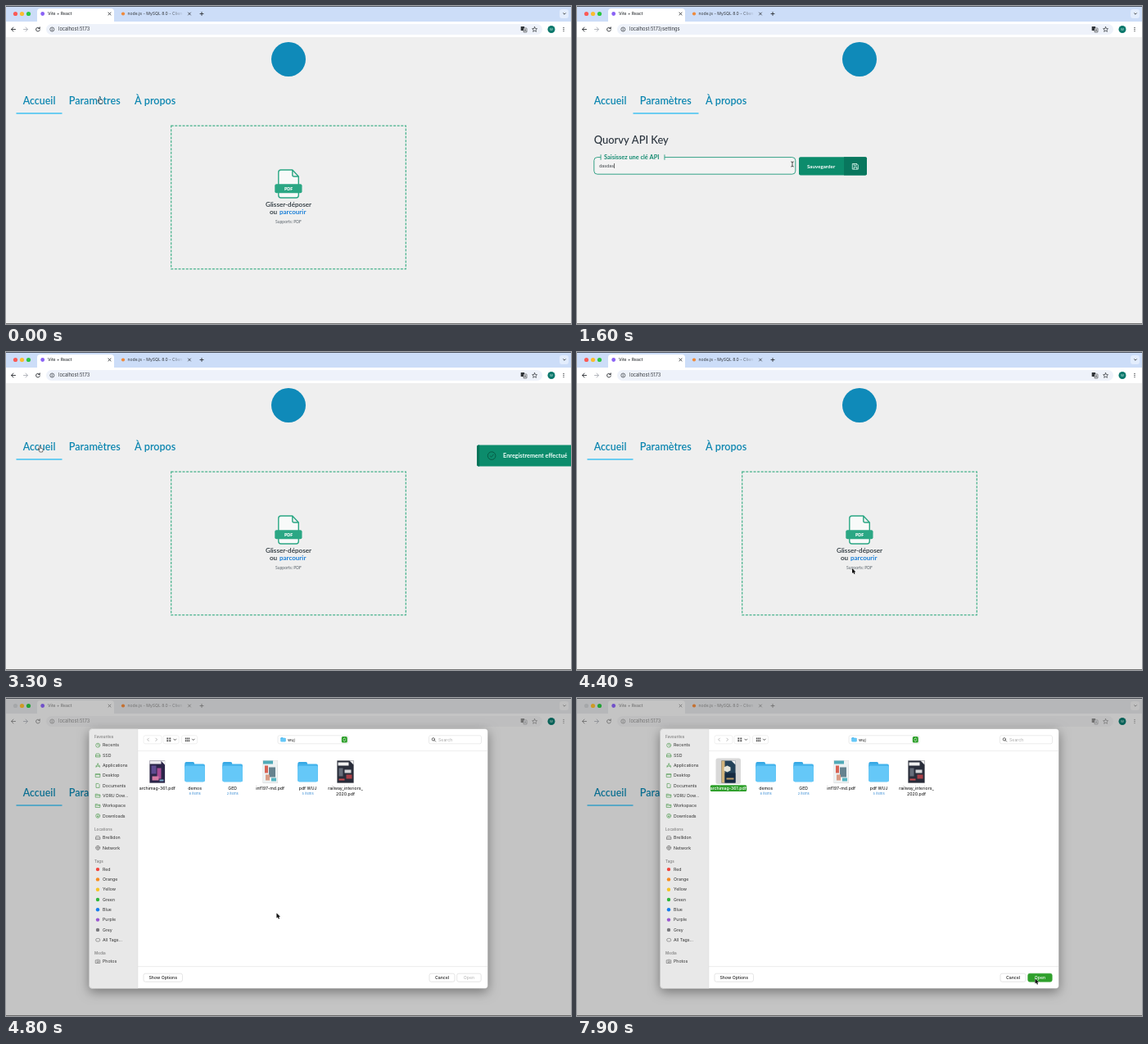
An HTML page with a canvas for the animation above (8000 ms loop, 690x388 px).

```html
<!DOCTYPE html>
<html lang="fr">
<head>
<meta charset="utf-8">
<style>
html, body { margin: 0; width: 100%; height: 100%; overflow: hidden; background: #efefef; }
canvas { display: block; width: 690px; height: 388px; }
</style>
</head>
<body>
<canvas id="stage"></canvas>
<script>
const LOOP = 8000, W = 690, H = 388;
const canvas = document.getElementById('stage');
const c = canvas.getContext('2d');
const ratio = window.devicePixelRatio || 1;
canvas.width = W * ratio;
canvas.height = H * ratio;

const UI = 'Inter, sans-serif', PAGE = 'Lato, sans-serif';
const GREEN = '#0c8c6c', SELECT = '#2fa02c';
const SETTINGS_AT = 300, SAVE_AT = 2200, HOME_AT = 3300;
const DIALOG_AT = 4450, SETTLE_AT = 4650, PICK_AT = 5450;

const clamp = v => Math.max(0, Math.min(1, v));
const ease = v => v * v * (3 - 2 * v);
const ramp = (t, from, to) => ease(clamp((t - from) / (to - from)));

function text(s, x, y, size, color, { font = UI, weight = 400, align = 'left' } = {}) {
  c.font = `${weight} ${size}px ${font}`;
  c.textAlign = align;
  c.textBaseline = 'middle';
  c.fillStyle = color;
  c.fillText(s, x, y);
}
function rect(x, y, w, h, color) {
  c.fillStyle = color;
  c.fillRect(x, y, w, h);
}
function box(x, y, w, h, r, fill, stroke, width = 0.7) {
  c.beginPath();
  c.roundRect(x, y, w, h, r);
  if (fill) { c.fillStyle = fill; c.fill(); }
  if (stroke) { c.strokeStyle = stroke; c.lineWidth = width; c.stroke(); }
}
function dot(x, y, r, fill, stroke, width = 0.7) {
  box(x - r, y - r, 2 * r, 2 * r, r, fill, stroke, width);
}
function path(d, x, y, { stroke, fill, width = 0.9 } = {}) {
  const p = new Path2D(d);
  c.save();
  c.translate(x, y);
  c.lineCap = c.lineJoin = 'round';
  if (fill) { c.fillStyle = fill; c.fill(p); }
  if (stroke) { c.strokeStyle = stroke; c.lineWidth = width; c.stroke(p); }
  c.restore();
}
const CROSS = 'M-1.5-1.5L1.5 1.5M1.5-1.5L-1.5 1.5';
const DOWN = 'M-1.4-.7L0 .7L1.4-.7';

function browser(url, inactive, sheet) {
  const ink = inactive ? '#8b8b8b' : '#303438';
  rect(0, 0, W, 20, inactive ? '#dedfe1' : '#ccddf8');
  dot(11.5, 9.5, 2.6, sheet ? '#c9cbce' : '#fb5b57');
  dot(19.5, 9.5, 2.6, '#fbbc2f');
  dot(27.5, 9.5, 2.6, '#2bc642');
  box(38, 3, 94, 20, 4, inactive ? '#efefef' : '#fff');
  rect(0, 19, W, 19, inactive ? '#efefef' : '#fff');

  dot(44.7, 9.5, 2.4, '#8a62f5');
  text('Vite + React', 51, 9.7, 5.1, ink, { weight: 500 });
  path(CROSS, 126.5, 9.5, { stroke: ink });
  dot(143, 9.5, 2.1, '#ef8a3c');
  const fade = c.createLinearGradient(200, 0, 216, 0);
  fade.addColorStop(0, ink);
  fade.addColorStop(1, 'rgba(80,85,95,.15)');
  text('node.js - MySQL 8.0 - Clien', 148.5, 9.7, 5.1, fade);
  path(CROSS, 224, 9.5, { stroke: ink, width: 0.8 });
  path('M-2 0H2M0-2V2', 239, 9.5, { stroke: ink });
  box(676, 4, 11, 11, 3, inactive ? '#eaeaea' : '#e3edfd');
  path(DOWN, 682, 9.5, { stroke: ink });

  path('M2.5 0H-2.5M0-2.5L-2.5 0L0 2.5', 9, 28.5, { stroke: ink });
  path('M-2.5 0H2.5M0-2.5L2.5 0L0 2.5', 24, 28.5, { stroke: '#aeb2b8' });
  path('M2-1.3A2.4 2.4 0 1 0 2.4 .5M2.3-2.7V-1H.7', 39, 28.5, { stroke: ink });
  box(49, 22, 606, 13, 6.5, inactive ? '#e8e8e9' : '#eef2fa');
  dot(56.3, 28.5, 2.5, null, ink, 0.7);
  path('M0 0V1.2M0-1.2V-1.1', 56.3, 28.5, { stroke: ink, width: 0.7 });
  text(url, 64, 28.6, 5.7, ink);
  box(628.7, 25, 4.4, 5, 0.5, ink);
  box(632, 27, 4, 5, 0.5, '#f4f6fa', ink, 0.6);
  path('M-1 1.5L0-1.2L1 1.5', 634, 29.5, { stroke: ink, width: 0.6 });
  path('M0-3L.9-1L3-.8L1.4 .7L1.9 2.8L0 1.7L-1.9 2.8L-1.4 .7L-3-.8L-.9-1Z', 645.6, 28.5, { stroke: ink, width: 0.7 });
  dot(666, 28.5, 4.5, '#0b786c');
  text('W', 666, 28.8, 4, '#d9efe9', { align: 'center' });
  for (let i = -1; i <= 1; i++) dot(681, 28.5 + 2.1 * i, 0.65, ink);
}

function pageHeader(settings) {
  rect(0, 38, W, H - 38, '#efefef');
  dot(345, 65, 21, '#0f8ab9');
  const nav = { font: PAGE, weight: 600 };
  text('Accueil', 20.7, 116.3, 12.4, '#0c86b0', nav);
  text('Paramètres', 76.7, 116.3, 12.6, '#0c86b0', nav);
  text('À propos', 157, 116.3, 12.6, '#0c86b0', nav);
  rect(settings ? 68.5 : 12.5, 130.2, settings ? 80 : 56, 1.6, '#4cc5f2');
}

function homePage() {
  c.save();
  c.strokeStyle = '#45b18b';
  c.lineWidth = 1.2;
  c.setLineDash([3, 1.6]);
  c.strokeRect(201.7, 146.2, 286.6, 174.6);
  c.restore();
  path('M3 0H17L24.5 8V31Q24.5 34 21.5 34H3Q0 34 0 31V3Q0 0 3 0ZM17 0V6Q17 8 19 8H24.5', 332.8, 200, { stroke: '#2ba784', fill: '#f8faf9', width: 1.4 });
  box(328.3, 217.3, 33.2, 11, 2, '#2ba784');
  text('PDF', 345, 223, 5.2, '#fff', { font: PAGE, weight: 900, align: 'center' });
  text('Glisser-déposer', 345, 242.6, 8.1, '#273239', { font: PAGE, weight: 600, align: 'center' });
  text('ou', 322, 251.8, 8.1, '#273239', { font: PAGE, weight: 600 });
  text('parcourir', 334, 251.8, 8, '#1c80d8', { font: PAGE, weight: 700 });
  text('Supports: PDF', 345, 263, 5, '#59626a', { font: PAGE, align: 'center' });
}

function settingsPage(t) {
  text('Quorvy API Key', 20.7, 164.5, 12.9, '#28323c', { font: PAGE, weight: 500 });
  box(20.8, 184.6, 246, 20.6, 4, '#f3f3f3', '#35a287', 1);
  rect(29, 183, 78, 4, '#f0f0f0');
  rect(28.6, 181.3, 0.9, 6.5, '#2a9d80');
  rect(106.5, 181.3, 0.9, 6.5, '#2a9d80');
  text('Saisissez une clé API', 33, 184.6, 7.4, '#138a70', { font: PAGE, weight: 700 });
  const typed = 'dasdasd'.slice(0, Math.max(0, Math.floor((t - 1150) / 75)));
  text(typed, 27, 195.2, 5.3, '#3c4146');
  if (t > 1100 && t < SAVE_AT) rect(27.3 + c.measureText(typed).width, 192, 0.7, 6, '#333');
  box(271, 184.3, 83, 22.3, 2, GREEN);
  box(326, 184.3, 28, 22.3, [0, 2, 2, 0], '#08765d');
  text('Sauvegarder', 281, 195.8, 6.2, '#fff', { font: PAGE, weight: 700 });
  path('M-3.3-3.3H1.8L3.3-1.8V3.3H-3.3ZM-1.8-3.2V-1.2H1.2V-3.2M-1.8 3.2V.7H1.8V3.2', 340, 195.8, { stroke: '#e5fff6', width: 0.8 });
}

function toast(t) {
  const shown = ramp(t, 2250, 2500) - ramp(t, 3200, 3450);
  if (shown <= 0) return;
  c.save();
  c.translate((1 - shown) * 182, 0);
  box(510, 113.6, 172.6, 26, 2, GREEN);
  box(510, 113.6, 3, 26, [2, 0, 0, 2], '#087258');
  box(659.5, 113.6, 23.1, 26, [0, 2, 2, 0], '#06644f');
  dot(528, 126.6, 4.8, null, '#075540', 0.9);
  path('M-2 .1L-.5 1.6L2.2-1.5', 528, 126.6, { stroke: '#075540' });
  text('Enregistrement effectué', 542, 126.7, 7.3, '#f0fffa', { font: PAGE, weight: 700 });
  path(CROSS, 671, 126.3, { stroke: '#033b2e' });
  c.restore();
}

function folder(x, y, w, h) {
  box(x, y, w * 0.48, h * 0.4, w * 0.08, '#38a9e5');
  box(x, y + h * 0.1, w, h * 0.9, w * 0.08, '#43b3ec');
  box(x, y + h * 0.2, w, h * 0.8, w * 0.08, '#65c8f8');
}

// Each cover is a background plus a few [x, y, w, h, colour] blocks.
function cover(x, y, w, h, back, blocks) {
  rect(x - 0.4, y - 0.4, w + 0.8, h + 0.8, '#d0d0d0');
  rect(x, y, w, h, back);
  blocks.forEach(b => rect(x + b[0], y + b[1], b[2], b[3], b[4]));
  path('M0 0H5V5Z', x + w - 5, y, { fill: '#f3f3f3' });
}
function magazine(t) {
  if (t < 5900) {
    cover(175.5, 39, 18.5, 27, '#2b2549', [[0, 0, 14, 4, '#ece9ef'], [2, 6, 6, 10, '#5e4b91'], [9, 9, 5, 13, '#a84b94'], [3, 19, 8, 5, '#d47aa3'], [12, 23, 5, 2, '#79a9c8']]);
  } else if (t < 6400) {
    cover(175.5, 39, 18.5, 27, '#f0eee6', [[0, 2, 5, 24, '#e5bd4d'], [5, 8, 9, 12, '#4b8588'], [7, 5, 6, 5, '#d6d9d0'], [1, 20, 17, 6, '#48656d']]);
  } else {
    cover(176.5, 39, 17, 27, '#24435a', [[0, 0, 4, 27, '#d2b47c'], [4, 15, 13, 12, '#162c43'], [6, 21, 9, 2, '#bd9b68']]);
    path('M-4-2L0-4L4-2V2L0 4L-4 2Z', 183.5, 49, { fill: '#e6e6dc' });
  }
}

function pushButton(label, x, y, w, active) {
  box(x, y, w, 10, 2.2, active ? SELECT : '#fff', active ? SELECT : '#d6d6d6', 0.6);
  const dim = label === 'Open' && !active;
  text(label, x + w / 2, y + 5.2, 5.2, active ? '#fff' : dim ? '#bcbcbc' : '#262626', { weight: 500, align: 'center' });
}

const GLYPHS = {
  clock: 'M2.5 0A2.5 2.5 0 1 1-2.5 0A2.5 2.5 0 1 1 2.5 0M0-1.4V0L1 .8',
  drive: 'M-1.7-2H1.7L2.7 .3V2H-2.7V.3ZM-2.7 .3H2.7',
  apps: 'M0-2.3L-2.2 2.2M0-2.3L2.2 2.2M-2.6 .8H2.6',
  desk: 'M-2.6-2H2.6V2H-2.6ZM-2.6-1H2.6',
  doc: 'M-1.8-2.5H.7L1.9-1.3V2.5H-1.8Z',
  folder: 'M-2.6-2H-.4L.3-1.2H2.6V2H-2.6ZM-2.6-.4H2.6',
  down: 'M2.5 0A2.5 2.5 0 1 1-2.5 0A2.5 2.5 0 1 1 2.5 0M0-1.3V1.3M-1 .3L0 1.3L1 .3',
  globe: 'M2.5 0A2.5 2.5 0 1 1-2.5 0A2.5 2.5 0 1 1 2.5 0M-2.5 0H2.5M0-2.5V2.5',
  tags: 'M-.8-1.8A1.8 1.8 0 1 0-.8 1.8H.8A1.8 1.8 0 1 0 .8-1.8Z',
  photo: 'M-2.6-1.6H-1.2L-.7-2.3H.7L1.2-1.6H2.6V2H-2.6ZM1.1 .2A1.1 1.1 0 1 1-1.1 .2A1.1 1.1 0 1 1 1.1 .2',
};
const FAVOURITES = [['Recents', 'clock'], ['SSD', 'drive'], ['Applications', 'apps'], ['Desktop', 'desk'],
  ['Documents', 'doc'], ['VORU Dow...', 'folder'], ['Workspace', 'folder'], ['Downloads', 'down']];
const TAGS = [['Red', '#f2463d'], ['Orange', '#f58c20'], ['Yellow', '#f7c325'], ['Green', '#2fb53c'],
  ['Blue', '#167df0'], ['Purple', '#9a56cf'], ['Grey', '#77777b']];
const STEP = 12.3;

function sidebar(network) {
  const head = (s, y) => text(s, 108, y, 4.6, '#8a8a8a', { weight: 600 });
  const row = (s, y, glyph, color = '#4c9a4c') => {
    path(GLYPHS[glyph], 112.2, y, { stroke: color, width: 0.65 });
    text(s, 118, y + 0.2, 5.25, '#303030');
  };
  head('Favourites', 10.5);
  FAVOURITES.forEach(([s, g], i) => row(s, 20.2 + i * STEP, g));
  head('Locations', 123);
  row('Brellidon', 133, 'drive', '#707070');
  if (network) row('Network', 133 + STEP, 'globe', '#707070');
  const y = network ? STEP : 0;
  head('Tags', 149.5 + y);
  TAGS.forEach(([s, color], i) => {
    dot(112, 159.3 + y + i * STEP, 2.2, color);
    text(s, 118, 159.5 + y + i * STEP, 5.25, '#303030');
  });
  row('All Tags...', 159.3 + y + 7 * STEP, 'tags', '#707070');
  head('Media', 262 + y);
  row('Photos', 271.7 + y, 'photo', '#707070');
}

function dialogToolbar() {
  const y = 13.3;
  box(168, 8.3, 22, 10, 2, '#fff', '#e0e0e0', 0.5);
  path('M.8-1.7L-.8 0L.8 1.7', 173.5, y, { stroke: '#aaa', width: 0.8 });
  path('M-.8-1.7L.8 0L-.8 1.7', 183.7, y, { stroke: '#aaa', width: 0.8 });
  [192, 214.5].forEach((x, n) => {
    box(x, 8.3, 19, 10, 2, '#fff', '#e0e0e0', 0.5);
    for (let i = 0; i < 4 + n * 2; i++) {
      const cols = 2 + n;
      rect(x + 4.3 + (i % cols) * (3 - n), y - 2.3 + Math.floor(i / cols) * 2.8, 2 - n * 0.5, 1.9, '#555');
    }
    path(DOWN, x + 14.3, y, { stroke: '#333', width: 0.8 });
  });
  box(332, 8.3, 86, 10, 2, '#fff', '#dedede', 0.6);
  folder(335.5, 10.8, 6, 5);
  text('wuj', 344, y + 0.2, 5.3, '#222');
  box(409.8, 9.6, 7, 7.4, 1.6, SELECT);
  path('M-1.3-.8L0-2L1.3-.8M-1.3 .8L0 2L1.3 .8', 413.3, y, { stroke: '#fff', width: 0.7 });
  box(516.5, 8.3, 64, 10, 2, '#fff', '#dcdcdc', 0.6);
  path('M1.3-.4A1.7 1.7 0 1 1-2.1-.4A1.7 1.7 0 1 1 1.3-.4M.8 .8L2.3 2.3', 522.3, y, { stroke: '#444', width: 0.8 });
  text('Search', 528, y + 0.2, 5.2, '#aaa');
}

function files(t, picked) {
  const label = (s, x, y, color = '#262626') => text(s, x, y, 5.2, color, { align: 'center', weight: 500 });
  if (picked) {
    box(169.5, 36, 30.5, 31.5, 2.5, '#d9d9d9');
    box(162.8, 68.7, 44.4, 7.8, 1.5, SELECT);
  }
  magazine(t);
  label('archimag-361.pdf', 184.7, 72.7, picked ? '#fff' : undefined);
  if (t > 5600 && t < 6900) {
    [[178.5, -1], [190.5, 1]].forEach(([x, side]) => {
      dot(x, 59.8, 4.1, '#17191d', '#b8b8b8', 0.5);
      path(`M${-1.8 * side} 0H${1.8 * side}M${0.3 * side}-1.5L${1.8 * side} 0L${0.3 * side} 1.5`, x, 59.8, { stroke: '#fff', width: 0.9 });
    });
  }
  [['demos', '8 items', 230.6], ['GED', '2 items', 276.7], ['pdf WUJ', '5 items', 368.6]].forEach(([name, count, x]) => {
    folder(x - 12.3, 40.5, 24.6, 24.3);
    label(name, x, 72.7);
    text(count, x, 79.2, 4.1, '#3d8fd5', { align: 'center' });
  });
  cover(314, 39, 17.5, 27, '#edf2f3', [[0, 0, 12, 4, '#50aab8'], [2, 6, 4, 9, '#d86354'], [7, 8, 8, 12, '#66828e'], [3, 17, 5, 7, '#d99d86'], [10, 21, 6, 4, '#55b4c2']]);
  label('inf197-md.pdf', 322.6, 72.7);
  cover(404.5, 39, 20, 27, '#292d3a', [[1, 2, 13, 4, '#f0f0f0'], [2, 9, 5, 10, '#656c79'], [9, 11, 8, 4, '#d6d7da'], [11, 17, 7, 5, '#aa4048'], [2, 22, 7, 2, '#c84b4e']]);
  label('railway_interiors_', 414.5, 72.7);
  label('2020.pdf', 414.5, 79.6);
}

function dialog(t) {
  const picked = t >= PICK_AT;
  c.save();
  c.translate(0, 30 + 7.5 * ramp(t, 4500, 4700));
  c.save();
  c.shadowColor = 'rgba(0,0,0,.4)';
  c.shadowBlur = 14 * ratio;
  c.shadowOffsetY = 4 * ratio;
  box(101.5, 0, 487, 317, 4, '#fff');
  c.restore();
  box(101.5, 0, 59.5, 317, [4, 0, 0, 4], '#e8e8e8');
  rect(160.7, 0, 0.5, 317, '#d9d9d9');
  rect(161, 26.7, 427.5, 0.6, '#e5e5e5');
  rect(161, 290, 427.5, 0.6, '#dedede');
  sidebar(t >= SETTLE_AT);
  dialogToolbar();
  files(t, picked);
  pushButton('Show Options', 168, 298.7, 47.5);
  pushButton('Cancel', 517, 298.7, 31);
  pushButton('Open', 550.7, 298.7, 29.5, picked);
  box(101.5, 0, 487, 317, 4, null, 'rgba(0,0,0,.2)', 0.5);
  c.restore();
}

// Pointer stops: time, x, y.
const STOPS = [[0, 115, 115], [350, 115, 115], [1050, 263, 193], [1900, 263, 193], [2120, 305, 196],
  [2300, 305, 196], [2680, 92, 193], [2850, 92, 193], [3180, 42, 118], [3400, 42, 118],
  [4000, 336, 264], [4400, 336, 264], [4500, 330.5, 262.5], [5050, 330.5, 262.5], [5400, 183.5, 87],
  [5800, 183.5, 87], [5900, 190, 96], [6000, 190, 96], [6100, 183.5, 87], [6350, 190, 96],
  [6850, 190, 96], [7700, 559.5, 342.5], [8000, 559.5, 342.5]];

function pointer(t, settings) {
  const i = STOPS.findIndex(s => s[0] > t);
  const [t0, x0, y0] = STOPS[i - 1], [t1, x1, y1] = STOPS[i];
  const k = ramp(t, t0, t1);
  const x = x0 + (x1 - x0) * k, y = y0 + (y1 - y0) * k;
  const inField = settings && x > 21 && x < 267 && y > 184 && y < 206;
  const onButton = settings && x > 271 && x < 354 && y > 184 && y < 207;
  const onNav = t < DIALOG_AT && x < 208 && y > 104 && y < 130;
  if (inField) {
    path('M-1.3-3Q0-3 0-2Q0-3 1.3-3M0-2V2M-1.3 3Q0 3 0 2Q0 3 1.3 3', x, y, { stroke: '#222', width: 0.8 });
  } else if (onButton || onNav) {
    path('M-1.2 1V-3Q-.5-4.2 .2-3V-.6L2.7 0Q3.5 .4 3.2 1.6L2.5 4H-.8L-3-.1Q-2.5-1.2-1.2 1Z', x, y, { stroke: '#333', fill: '#fff', width: 0.7 });
  } else {
    path('M0 0V6L1.4 4.8L2.4 7L3.5 6.5L2.5 4.4H4.4Z', x, y, { stroke: '#fff', fill: '#111', width: 0.7 });
    path('M0 0V6L1.4 4.8L2.4 7L3.5 6.5L2.5 4.4H4.4Z', x, y, { fill: '#111' });
  }
}

function draw(t) {
  const settings = t >= SETTINGS_AT && t < HOME_AT;
  const open = t >= DIALOG_AT;
  c.setTransform(ratio, 0, 0, ratio, 0, 0);
  browser(settings ? 'localhost:5173/settings' : 'localhost:5173', t >= SETTLE_AT, open);
  pageHeader(settings);
  if (settings) settingsPage(t); else homePage();
  toast(t);
  if (open) {
    rect(0, 0, W, H, `rgba(0,0,0,${0.11 + 0.07 * ramp(t, 4500, 4800)})`);
    dialog(t);
  }
  rect(0, 0, W, 0.8, '#30343b');
  rect(0, H - 0.8, W, 0.8, '#555');
  pointer(t, settings);
}

function frame() {
  draw(performance.now() % LOOP);
  requestAnimationFrame(frame);
}
frame();
</script>
</body>
</html>
```
